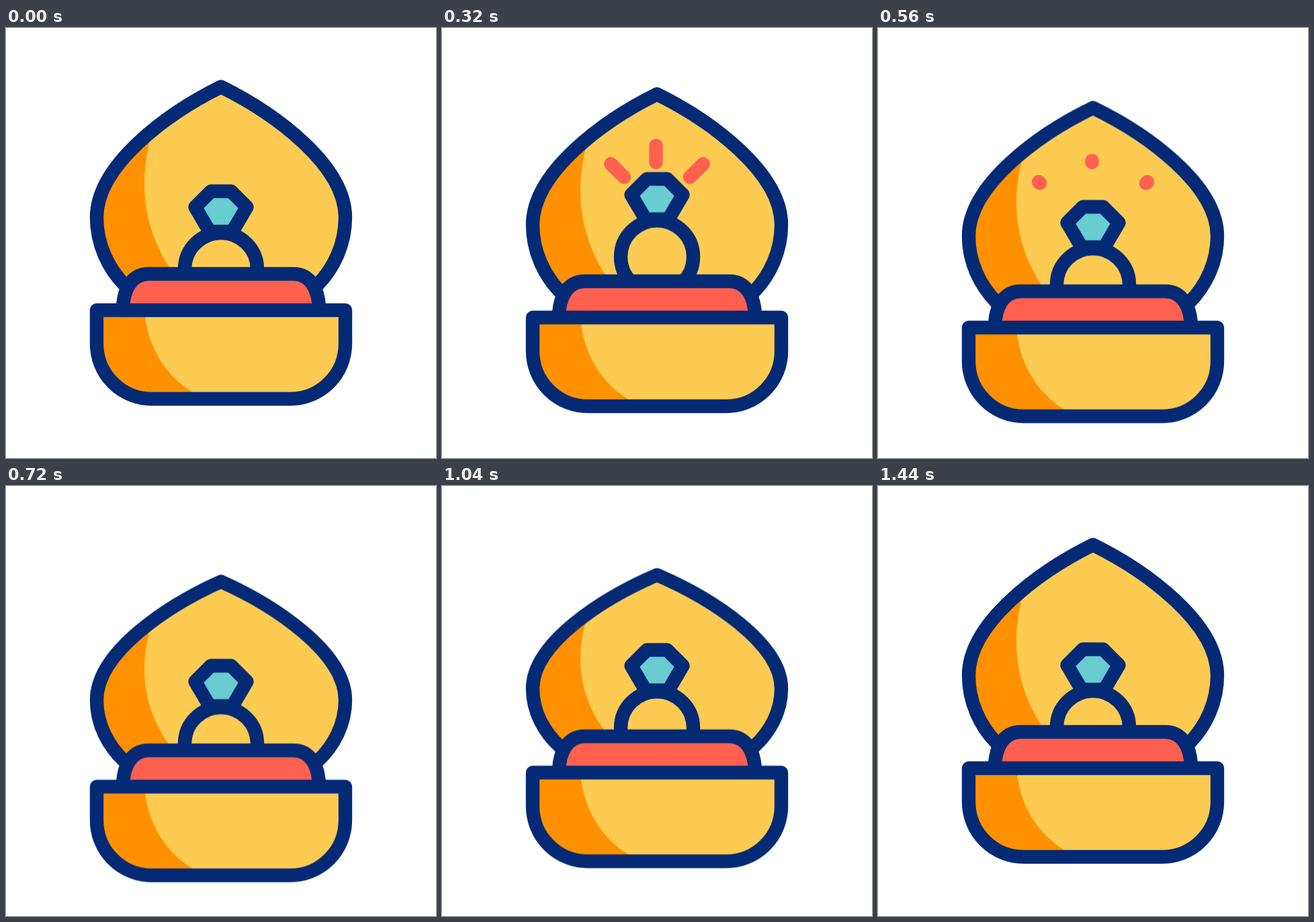
These frames come from a looping animation (640x640 px, 1.56 s). An HTML page:

```html
<!DOCTYPE html>
<html lang="en">
<head>
<meta charset="utf-8">
<title>Ring box</title>
<style>
  html, body { margin: 0; width: 100%; height: 100%; overflow: hidden; background: #fff; }
  svg { display: block; width: 100vw; height: 100vh; }

  .line { fill: none; stroke: #042a76; stroke-width: 20.4; stroke-linecap: round; stroke-linejoin: round; }
  .gold { fill: #fdcb52; }
  .shade { fill: #ff9100; }
  .velvet { fill: #ff6050; }
  .gem { fill: #68ccd1; }

  .box, .lid, .ring, .rays, .ray, .side {
    animation: 1560ms cubic-bezier(.333, 0, .667, 1) infinite;
  }

  .box { animation-name: drop; }
  @keyframes drop {
    0%, 7.05% { transform: translateY(0); animation-timing-function: cubic-bezier(.33, 0, .48, 1); }
    43.59%, 46.15% { transform: translateY(27.5px); }
    76.28%, 100% { transform: translateY(0); }
  }

  .lid { animation-name: squash; transform-origin: 320px 380px; }
  .lid .line { vector-effect: non-scaling-stroke; }
  @keyframes squash {
    0%, 29.49% { transform: scaleY(1); }
    60.26% { transform: scaleY(.836); }
    82.69%, 100% { transform: scaleY(1); }
  }

  .ring { animation-name: hop; }
  @keyframes hop {
    0%, 5.45% { transform: translateY(0); }
    16.03%, 18.27% { transform: translateY(-20px); }
    38.78%, 42.95% { transform: translateY(25.5px); }
    69.87%, 100% { transform: translateY(0); }
  }

  .rays {
    fill: none; stroke: #ff6050; stroke-width: 20.4; stroke-linecap: round;
    animation-name: show; animation-timing-function: step-end;
  }
  @keyframes show {
    0% { visibility: hidden; }
    10.58% { visibility: visible; }
    38.14%, 100% { visibility: hidden; }
  }

  .ray { stroke-dasharray: 1 2; animation-name: grow; }
  @keyframes grow {
    0%, 10.26% { stroke-dashoffset: 1; }
    24.36% { stroke-dashoffset: 0; }
    38.46%, 100% { stroke-dashoffset: 1; }
  }

  .side { animation-name: spread; }
  @keyframes spread {
    0%, 20.51% { transform: translate(0, 0); }
    36.54%, 100% { transform: translate(-30px, 9px); }
  }
</style>
</head>
<body>
<svg viewBox="0 0 640 640">
  <defs>
    <clipPath id="lidClip">
      <path d="M320 87.5C240 127 135 204 135 282C135 322 152 357 176 382L200 402H440L464 382C488 357 505 322 505 282C505 204 400 127 320 87.5Z"/>
    </clipPath>
    <clipPath id="baseClip">
      <path d="M135 420H505V470A82 82 0 0 1 423 552H217A82 82 0 0 1 135 470Z"/>
    </clipPath>
  </defs>

  <g class="box">
    <g class="lid">
      <g clip-path="url(#lidClip)">
        <path class="gold" d="M100 60H540V420H100Z"/>
        <path class="shade" d="M222 140C212 170 206 200 206 232C206 278 220 320 243 356L262 410H100V140Z"/>
      </g>
      <path class="line" d="M320 87.5C240 127 135 204 135 282C135 322 152 357 176 382L200 402H440L464 382C488 357 505 322 505 282C505 204 400 127 320 87.5Z"/>
    </g>
  </g>

  <g class="rays">
    <path class="ray" pathLength="1" d="M318.5 200V169.5"/>
    <g class="side"><path class="ray" pathLength="1" d="M271 222l-24 -24"/></g>
    <g transform="matrix(-1 0 0 1 640 0)">
      <g class="side"><path class="ray" pathLength="1" d="M271 222l-24 -24"/></g>
    </g>
  </g>

  <g class="ring">
    <path class="gem" d="M305 243H335L358.5 266.5L337 303H303L281.5 266.5Z"/>
    <path class="line" d="M305 243H335L358.5 266.5L337 303H303L281.5 266.5Z"/>
    <circle class="line" cx="320" cy="359" r="54"/>
  </g>

  <g class="box">
    <path class="velvet" d="M174 420C174 388 188 366 212 366H428C452 366 466 388 466 420Z"/>
    <path class="line" d="M174 420C174 388 188 366 212 366H428C452 366 466 388 466 420"/>
    <g clip-path="url(#baseClip)">
      <path class="gold" d="M120 410H520V560H120Z"/>
      <path class="shade" d="M206 420L207 430C213 478 240 520 278 542L296 560H120V420Z"/>
    </g>
    <path class="line" d="M135 420H505V470A82 82 0 0 1 423 552H217A82 82 0 0 1 135 470Z"/>
  </g>
</svg>
</body>
</html>
```
